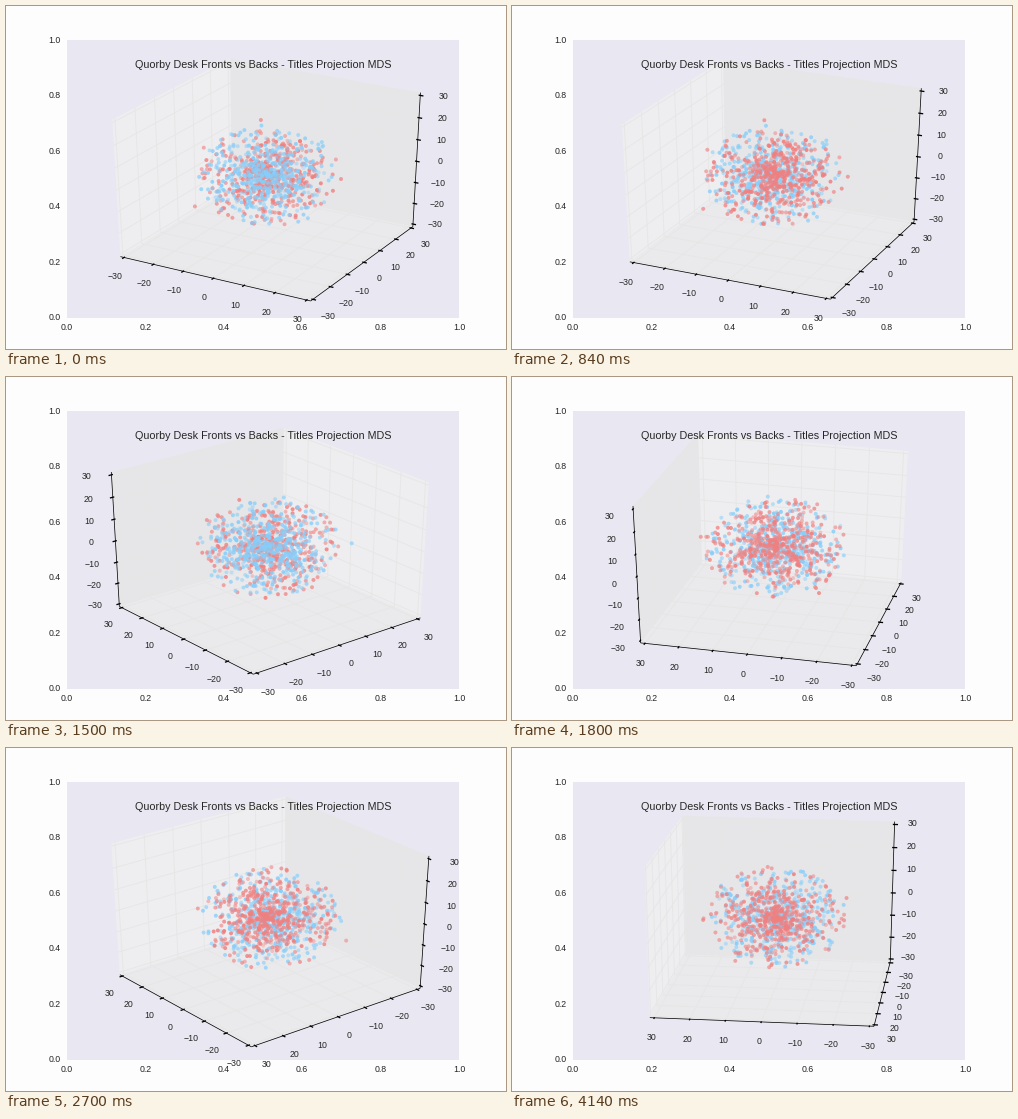
A matplotlib script that plays this animation: 500x343 px, repeating every 4200 ms.

```python
import numpy as np
import matplotlib.pyplot as plt
from matplotlib.animation import FuncAnimation
from matplotlib.collections import LineCollection, PolyCollection

W, H, DPI = 500, 343, 62.5
FRAMES, INTERVAL = 70, 60
LEFT, RIGHT, TOP, BOTTOM = 61, 453, 34.3, 312
DIST = 10
SCALE_X, SCALE_Y = 2108, (BOTTOM - TOP) / 0.185
CX, CY = 263, BOTTOM - 0.095 * SCALE_Y
EDGE = 0.5 + 1 / 48           # box half size, slightly past the limits
TICKS = np.arange(-30, 31, 10)
LABEL_PAD, LABEL_DROP = 0.083, 2.8
INK = "0.15"

plt.rcParams["font.family"] = "Liberation Sans"
plt.rcParams["font.size"] = 10.15

# Drag path of the camera: time in frames, azimuth, elevation
KEY_T = np.array([0, 14, 25, 30, 45, 54, 69], float)
KEY_AZ = np.array([-60, -65.2, -129.4, -165.6, -218.7, -263, -263])
KEY_EL = np.array([30, 30, 30.4, 31, 32.6, 22, 22])


def ease(t, ts, vs):
    """Monotone cubic through the key values."""
    h, d = np.diff(ts), np.diff(vs) / np.diff(ts)
    m = np.zeros(len(ts))
    for k in range(1, len(ts) - 1):
        if d[k - 1] * d[k] > 0:
            m[k] = 2 * d[k - 1] * d[k] / (d[k - 1] + d[k])
    i = min(np.searchsorted(ts, t, side="right") - 1, len(h) - 1)
    s = (t - ts[i]) / h[i]
    return ((1 + 2 * s) * (1 - s) ** 2 * vs[i] + s * (1 - s) ** 2 * h[i] * m[i]
            + s * s * (3 - 2 * s) * vs[i + 1] + s * s * (s - 1) * h[i] * m[i + 1])


def project(p, az, el):
    """Perspective view of unit-cube points: pixel positions and depth."""
    p = np.asarray(p, float)
    x, y, z = p[..., 0], p[..., 1], p[..., 2]
    side = -x * np.sin(az) + y * np.cos(az)
    ahead = x * np.cos(az) + y * np.sin(az)
    up = z * np.cos(el) - ahead * np.sin(el)
    depth = DIST - ahead * np.cos(el) - z * np.sin(el)
    xy = np.stack([CX + SCALE_X * side / depth, CY - SCALE_Y * up / depth], -1)
    return xy, depth


def ball(rng, n, extra):
    """Random ball, denser towards the middle, plus a few outliers."""
    v = rng.normal(size=(n, 3))
    v /= np.linalg.norm(v, axis=1, keepdims=True)
    r = 20.8 * rng.random((n, 1)) ** 0.7
    return np.vstack([v * r, extra]) / 60


rng = np.random.default_rng(7)
blue = ball(rng, 490, [(18.2, -14.9, 1.4)])
red = ball(rng, 490, [(-14.8, -16.5, -10.3), (-5.5, 20.3, 4.6),
                      (-20.1, -2.5, 8.3), (-6, 5.8, 20.8)])

fig = plt.figure(figsize=(W / DPI, H / DPI), dpi=DPI, facecolor="#fdfdfd")
ax = fig.add_axes([0, 0, 1, 1])
ax.set_xlim(0, W)
ax.set_ylim(H, 0)
ax.axis("off")

ax.add_patch(plt.Rectangle((LEFT, TOP), RIGHT - LEFT, BOTTOM - TOP,
                           fc="#e9e8f2", ec="none", zorder=0))
for f in np.linspace(0, 1, 6):
    ax.text(LEFT + f * (RIGHT - LEFT), 322, f"{f:.1f}", color=INK,
            ha="center", va="center")
    ax.text(55, BOTTOM - f * (BOTTOM - TOP), f"{f:.1f}", color=INK,
            ha="right", va="center")
ax.text(257, 61.5, "Quorby Desk Fronts vs Backs - Titles Projection MDS",
        color=INK, fontsize=12.35, ha="center", va="baseline", zorder=9)

panes = PolyCollection([], zorder=1, linewidths=0, alpha=0.8,
                       facecolors=["0.94", "0.90", "0.92"])
grid = LineCollection([], zorder=2, colors="0.9", linewidths=1)
spines = LineCollection([], zorder=3, colors="k", linewidths=0.85)
marks = LineCollection([], zorder=3, colors="k", linewidths=1.5)
for c in (panes, grid, spines, marks):
    ax.add_collection(c, autolim=False)
labels = [[ax.text(0, 0, str(v).replace("-", "\u2212"), color=INK, ha="center",
                   va="center", zorder=8) for v in TICKS] for _ in range(3)]
dots = [(blue, np.array([135, 206, 250]) / 255, ax.scatter([], [], s=21, lw=0)),
        (red, np.array([240, 128, 128]) / 255, ax.scatter([], [], s=21, lw=0))]


def draw_box(az, el):
    near = np.array([np.sign(np.cos(az)), np.sign(np.sin(az)), 1]) * EDGE
    far = -near

    def put(base, **kw):
        q = np.array(base, float)
        for name, v in kw.items():
            q["xyz".index(name)] = v
        return q

    faces = []
    for k in range(3):
        i, j = [n for n in range(3) if n != k]
        quad = []
        for a, b in ((-1, -1), (1, -1), (1, 1), (-1, 1)):
            q = far.copy()
            q[i], q[j] = a * EDGE, b * EDGE
            quad.append(q)
        faces.append(quad)
    panes.set_verts(list(project(faces, az, el)[0]))

    # Axis lines sit on one near edge of the floor or wall
    starts = [put(far, y=near[1]), put(far, x=near[0]), put(far, x=near[0])]
    tick_dirs = [1, 0, 0]
    grid_lines, axis_lines, tick_lines = [], [], []
    for k, start in enumerate(starts):
        lo, hi = start.copy(), start.copy()
        lo[k], hi[k] = -EDGE, EDGE
        axis_lines.append([lo, hi])
        i, j = [n for n in range(3) if n != k]
        d = tick_dirs[k]
        out = np.sign(start[d]) / 12
        for text, v in zip(labels[k], TICKS / 60):
            corner = far.copy()
            corner[k] = v
            a, b = corner.copy(), corner.copy()
            a[i], b[j] = near[i], near[j]
            grid_lines.append([a, corner, b])

            p = start.copy()
            p[k] = v
            t0, t1 = p.copy(), p.copy()
            t0[d] += 0.2 * out
            t1[d] -= 0.1 * out
            tick_lines.append([t0, t1])

            for n in (i, j):
                p[n] += np.sign(p[n]) * LABEL_PAD
            x, y = project(p, az, el)[0]
            text.set_position((x, y + LABEL_DROP))
    for coll, lines in ((grid, grid_lines), (spines, axis_lines),
                        (marks, tick_lines)):
        coll.set_segments(list(project(lines, az, el)[0]))


def update(i):
    az_deg = ease(i, KEY_T, KEY_AZ)
    az, el = np.radians(az_deg), np.radians(ease(i, KEY_T, KEY_EL))
    draw_box(az, el)
    blue_front = az_deg > -62.5 or -147 < az_deg < -97
    for (pts, rgb, sc), z in zip(dots, (6, 5) if blue_front else (5, 6)):
        xy, depth = project(pts, az, el)
        order = np.argsort(-depth)
        fade = (depth - depth.min()) / np.ptp(depth)
        rgba = np.column_stack([np.tile(rgb, (len(pts), 1)), 1 - 0.7 * fade])
        sc.set_offsets(xy[order])
        sc.set_facecolors(rgba[order])
        sc.set_zorder(z)
    return []


anim = FuncAnimation(fig, update, frames=FRAMES, interval=INTERVAL,
                     init_func=lambda: update(0), repeat=True)
plt.show()
```
